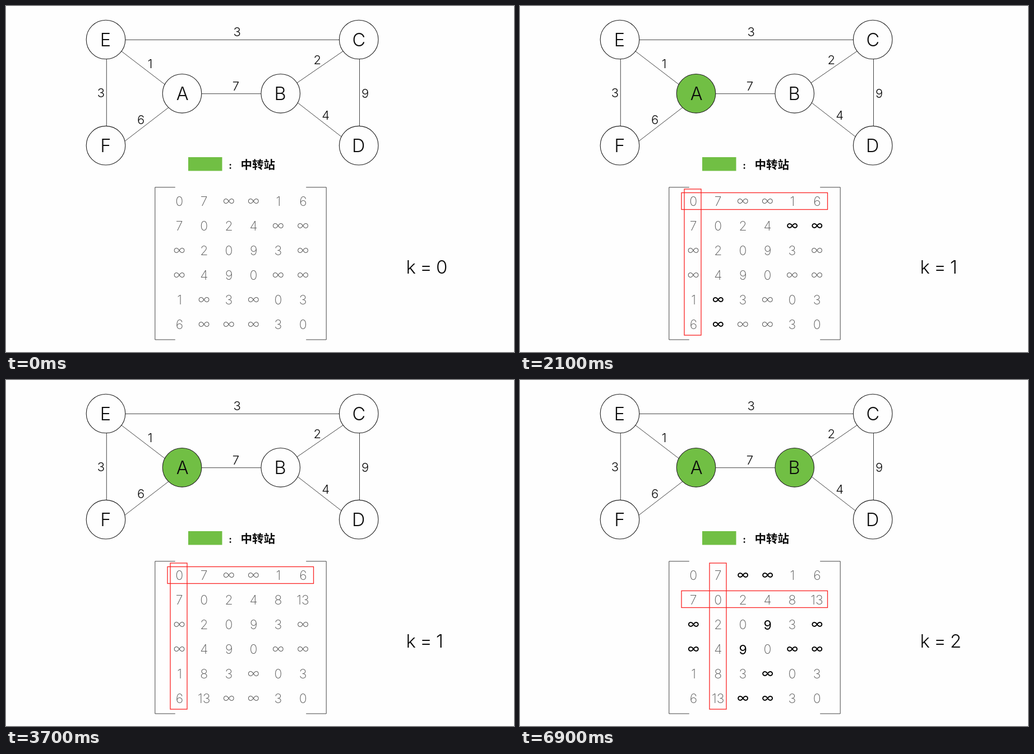
Write an HTML page with a canvas that moves like this. It is 906 px wide and 618 px high and loops after 8 s.

```html
<!DOCTYPE html>
<html lang="zh">
<head>
<meta charset="utf-8">
<style>
  html, body { margin: 0; width: 100%; height: 100%; overflow: hidden; background: #fefefe; }
  canvas { display: block; }
</style>
</head>
<body>
<canvas id="stage" width="906" height="618"></canvas>
<script>
const ctx = document.getElementById('stage').getContext('2d');
const LATIN = 'Inter, "Liberation Sans", sans-serif';
const CJK = '"Noto Sans CJK SC", "Noto Sans CJK", sans-serif';
const GREEN = '#71bf44', PAPER = '#fefefe', INK = '#0c0c0c', LINE = '#444';

const nodes = {
  A: [314, 156.3], B: [489.7, 156.3], C: [629.2, 60],
  D: [629.2, 249.2], E: [178, 60], F: [178, 249.2]
};
const names = Object.keys(nodes);
// ends, weight, and how far below each node's centre the line aims
const edges = [
  ['EC', 3], ['EA', 1, 0, 8], ['FE', 3], ['FA', 6, 17, 5],
  ['AB', 7], ['BC', 2], ['BD', 4, -6.6, 9], ['CD', 9]
];

// Text centred on its visible ink
function label(s, x, y, size, weight = 300, color = INK, family = LATIN) {
  ctx.font = `${weight} ${size}px ${family}`;
  ctx.fillStyle = color;
  const m = ctx.measureText(s);
  ctx.fillText(s,
    x + (m.actualBoundingBoxLeft - m.actualBoundingBoxRight) / 2,
    y + (m.actualBoundingBoxAscent - m.actualBoundingBoxDescent) / 2);
}

// Font size at which the infinity sign is 19 px wide
function infinitySize(weight) {
  ctx.font = `${weight} 100px ${LATIN}`;
  const m = ctx.measureText('∞');
  return 1900 / (m.actualBoundingBoxLeft + m.actualBoundingBoxRight);
}

function polyline(...points) {
  ctx.beginPath();
  for (const [x, y] of points) ctx.lineTo(x, y);
  ctx.strokeStyle = LINE;
  ctx.lineWidth = 1;
  ctx.stroke();
}

function startMatrix() {
  const d = names.map(a => names.map(b => a === b ? 0 : Infinity));
  for (const [[a, b], w] of edges) {
    const i = names.indexOf(a), j = names.indexOf(b);
    d[i][j] = d[j][i] = w;
  }
  return d;
}

const relax = (d, via) => d.map((row, i) => row.map((v, j) => Math.min(v, d[i][via] + d[via][j])));

function drawEdge([[a, b], w, dropA = 0, dropB = 0]) {
  const [ax, ay] = nodes[a], [bx, by] = nodes[b];
  const x1 = ax + 1.3, y1 = ay + 0.4 + dropA;
  const x2 = bx + 1.3, y2 = by + 0.4 + dropB;
  polyline([x1, y1], [x2, y2]);
  // the weight stands beside the midpoint, further off for flatter lines
  const len = Math.hypot(x2 - x1, y2 - y1);
  const ux = (x2 - x1) / len, uy = (y2 - y1) / len;
  const gap = 10 + 4 * ux, along = 7 * ux ** 6;
  label(String(w),
    (x1 + x2) / 2 + ux * along + uy * gap,
    (y1 + y2) / 2 + uy * along - ux * gap, 22);
}

function drawNode(name, active) {
  const [x, y] = nodes[name];
  ctx.beginPath();
  ctx.arc(x, y, 34.8, 0, Math.PI * 2);
  ctx.fillStyle = active ? GREEN : PAPER;
  ctx.fill();
  ctx.strokeStyle = '#222';
  ctx.lineWidth = 1.1;
  ctx.stroke();
  label(name, x + 0.3, y - 0.5, 32.5);
}

function drawLegend() {
  ctx.fillStyle = GREEN;
  ctx.fillRect(325, 270, 60.5, 24.5);
  label(':', 400.5, 286, 16, 700, INK, CJK);
  label('中转站', 449.5, 283, 20.5, 700, INK, CJK);
}

function drawMatrix(d, k, marking) {
  for (const [x, lip] of [[265.8, 36], [571.2, -36]]) {
    polyline([x + lip, 323.8], [x, 323.8], [x, 596], [x + lip, 596]);
  }
  const next = marking ? relax(d, k - 1) : d;
  d.forEach((row, i) => row.forEach((v, j) => {
    const marked = next[i][j] < v, endless = v === Infinity;
    const weight = marked ? 400 : 200;
    label(endless ? '∞' : String(v), 309.2 + 44.1 * j, 348.5 + 44 * i,
      endless ? infinitySize(weight) : 23, weight, marked ? '#000' : '#5a5a5a');
  }));
  if (!k) return;
  ctx.strokeStyle = '#fa2222';
  ctx.lineWidth = 1.3;
  ctx.strokeRect(288, 333.5 + 43 * (k - 1), 260.5, 30);
  ctx.strokeRect(293 + 45 * (k - 1), 327, 30, 261);
}

function drawCounter(k) {
  ctx.font = `300 33px ${LATIN}`;
  ctx.wordSpacing = '-2px';
  ctx.fillStyle = INK;
  ctx.fillText(`k = ${k}`, 713.5, 478);
  ctx.wordSpacing = '0px';
}

function frame(now) {
  const t = now % 8000;
  const step = t < 500 ? 0 : 1 + Math.floor((t - 500) / 1600);
  const k = Math.ceil(step / 3);
  let d = startMatrix();
  for (let via = 0; via < Math.floor(step / 3); via++) d = relax(d, via);

  ctx.fillStyle = PAPER;
  ctx.fillRect(0, 0, 906, 618);
  edges.forEach(drawEdge);
  names.forEach((name, i) => drawNode(name, i < k));
  drawLegend();
  drawMatrix(d, k, step % 3 === 2);
  drawCounter(k);
  requestAnimationFrame(frame);
}
requestAnimationFrame(frame);
</script>
</body>
</html>
```
